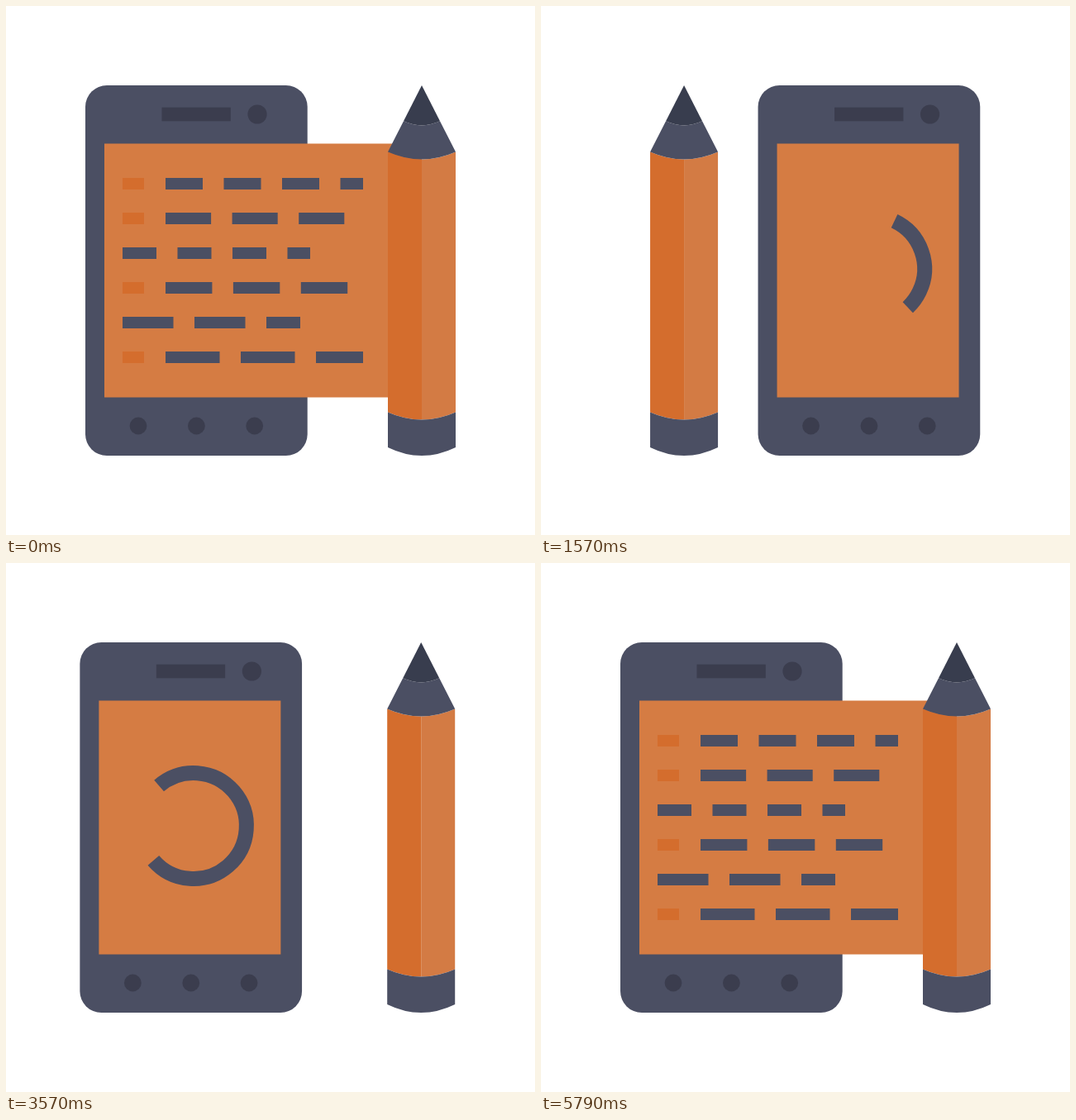
These frames come from a looping animation (640 by 640 pixels, 6000 ms). An HTML page with a canvas:

```html
<!DOCTYPE html>
<html lang="en">
<head>
<meta charset="utf-8">
<title>Phone and pencil</title>
<style>
html, body { margin: 0; width: 100%; height: 100%; overflow: hidden; background: #fff; }
canvas { display: block; width: 640px; height: 640px; }
</style>
</head>
<body>
<canvas id="stage" width="640" height="640"></canvas>
<script>
const ctx = document.getElementById('stage').getContext('2d');
const LOOP = 6000;
const SLATE = '#4b4f63', DARK = '#3b3d4e', TIP = '#383d4e';
const PAPER = '#d57c43', LIGHT = '#d37b44', DEEP = '#d46d2d';
const SCREEN_LEFT = 23, SCREEN_RIGHT = 243;

// Sweeps: start, end, pencil offset and phone offset reached (from the stage centre)
const REST = [183, -89.65];
const SWEEPS = [
  [0, 440, 196, -102.6],
  [471, 1900, -196, 102.6],
  [2033, 3324, 196, -102.6],
  [3410, 4600, -114, 39.4],
  [4630, 5790, ...REST]
];

// Text rows: has a bullet, line length, dash length
const ROWS = [
  [1, 239, 45], [1, 239, 55.1], [0, 227, 41],
  [1, 239, 56.4], [0, 215, 61.5], [1, 239, 65.5]
];

function ease(t, start, end) {
  const x = Math.min(1, Math.max(0, (t - start) / (end - start)));
  return (1 - Math.cos(Math.PI * x)) / 2;
}

function offsets(t) {
  let [pencil, phone] = REST;
  for (const [start, end, pencilTo, phoneTo] of SWEEPS) {
    const k = ease(t, start, end);
    pencil += (pencilTo - pencil) * k;
    phone += (phoneTo - phone) * k;
  }
  return [pencil, phone];
}

function rect(color, x, y, w, h) {
  ctx.fillStyle = color;
  ctx.fillRect(x, y, w, h);
}

function dot(x, y, r) {
  ctx.beginPath();
  ctx.arc(x, y, r, 0, 2 * Math.PI);
  ctx.fill();
}

function shape(color, path) {
  ctx.fillStyle = color;
  ctx.fill(new Path2D(path));
}

function drawPhone() {
  ctx.fillStyle = SLATE;
  ctx.beginPath();
  ctx.roundRect(0, 96, 268.7, 448, 26);
  ctx.fill();
  rect(DARK, 92.5, 122.7, 83.3, 16.6);
  dot(208, 131, 11.6);
  for (const x of [64, 134.4, 204.7]) dot(x, 508, 10.4);
}

function paperEdge(t, pencilX) {
  if (t < 471) return pencilX;
  if (t < 1950) return 433 - 190 * ease(t, 471, 1195);
  return t > 4630 ? Math.max(SCREEN_RIGHT, pencilX) : SCREEN_RIGHT;
}

function drawText(t, pencilX) {
  if (t > 1950 && t < 4630) return;
  const typed = t < 1950 ? 1 - ease(t, 471, 1301) : ease(t, 5100, 5790);
  ctx.save();
  ctx.beginPath();
  ctx.rect(0, 0, Math.max(0, pencilX), 640);
  ctx.clip();
  ROWS.forEach(([bullet, length, dash], i) => {
    const y = 208 + 42 * i, left = bullet ? 97 : 45;
    if (bullet) rect(DEEP, 45, y, 26, 14);
    const end = length * typed;
    for (let x = 0; x < end; x += dash + 25.5)
      rect(SLATE, left + x, y, Math.min(dash, end - x), 14);
  });
  ctx.restore();
}

function drawSpinner(t) {
  const sweep = 1.5 * Math.PI * ease(t, 1308, 1900) * (1 - ease(t, 4880, 5200));
  if (sweep <= 0) return;
  const start = -Math.PI / 2 + 12 * Math.PI * ease(t, 1308, 5108);
  ctx.strokeStyle = SLATE;
  ctx.lineWidth = 18;
  ctx.beginPath();
  ctx.arc(137.5, 318, 64, start, start + sweep);
  ctx.stroke();
}

function drawPencil() {
  shape(DEEP, 'M-41 176.5Q-20.5 185.5 0 185.5V500.5Q-20.5 500.5-41 491.5Z');
  shape(LIGHT, 'M41 176.5Q20.5 185.5 0 185.5V500.5Q20.5 500.5 41 491.5Z');
  shape(SLATE, 'M-22 139.3L-41 176.5Q-20.5 185.5 0 185.5T41 176.5L22 139.3Q0 149.5-22 139.3Z');
  shape(TIP, 'M0 96L22 139.3Q0 149.5-22 139.3Z');
  shape(SLATE, 'M-41 491.5Q-20.5 500.5 0 500.5T41 491.5V534Q20.5 544 0 544T-41 534Z');
}

function draw(t) {
  const [pencil, phone] = offsets(t);
  const phoneX = 320 + phone - 134.35;
  const pencilX = 320 + pencil - phoneX;
  rect('#fff', 0, 0, 640, 640);
  ctx.save();
  ctx.translate(phoneX, 0);
  drawPhone();
  rect(PAPER, SCREEN_LEFT, 166.5, paperEdge(t, pencilX) - SCREEN_LEFT, 307);
  drawText(t, pencilX);
  drawSpinner(t);
  ctx.translate(pencilX, 0);
  drawPencil();
  ctx.restore();
}

const begin = performance.now();
function tick() {
  draw((performance.now() - begin) % LOOP);
  requestAnimationFrame(tick);
}
tick();
</script>
</body>
</html>
```
